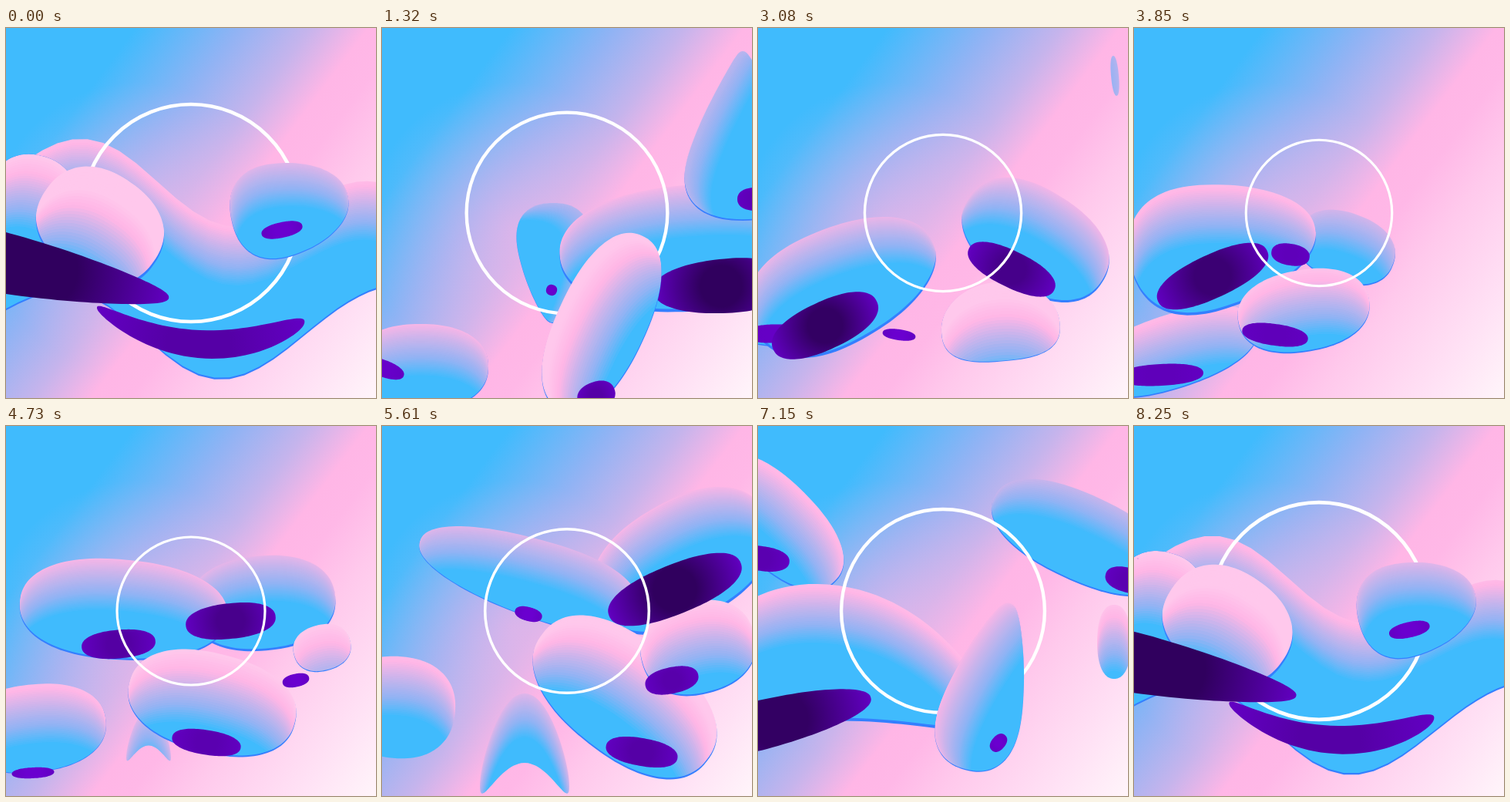
An HTML page with a canvas for the animation above (8.36 s loop, 480 by 480 pixels).

```html
<!DOCTYPE html>
<html lang="en">
<head>
<meta charset="utf-8">
<title>Flowing shapes</title>
<style>
  html, body { margin: 0; width: 100%; height: 100%; overflow: hidden; }
  canvas { display: block; width: 480px; height: 480px; }
</style>
</head>
<body>
<canvas width="480" height="480"></canvas>
<script>
const SIZE = 480, LOOP = 8360, STEP = 110, DEPTH = 95, BANDS = 30;
const stage = document.querySelector("canvas").getContext("2d");
const layer = new OffscreenCanvas(SIZE, SIZE).getContext("2d");

const RAMP = [[255, 200, 236], [255, 182, 230], [198, 180, 236], [145, 179, 244], [64, 187, 253]];
const ORDER = ["cap", "spur", "edge", "main", "lobe", "fold", "nose"];

// body and hole: x, y, half length, half thickness, tilt in degrees, taper, bend, wave
// tone: where on the ramp the lit side starts; front: above the ring
const POSES = [
  { time: 0,
    main: { body: [188, 300, 370, 102, 4, 0, 0, 50], hole: [250, 410, 135, 18, 4, .2, -38] },
    lobe: { body: [30, 232, 60, 68, 15], tone: 0 },
    fold: { body: [122, 258, 85, 70, 35], hole: [40, 314, 175, 36, 12, -.45], tone: -.3, front: true },
    nose: { body: [368, 234, 77, 60, -12, -.2], hole: [358, 262, 27, 10, -12], tone: .4, front: true } },
  { time: 1320,
    cap: { body: [222, 305, 78, 42, 90, -.5], hole: [220, 340, 7, 7, 20], tone: .6 },
    main: { body: [410, 285, 180, 82, -4], hole: [440, 335, 88, 35, -4, .1], tone: .3 },
    lobe: { body: [50, 440, 88, 56, 0], hole: [0, 441, 30, 11, 20], tone: .3 },
    fold: { body: [285, 383, 125, 58, -65], hole: [278, 477, 25, 18, -20], tone: -.1, front: true },
    nose: { body: [468, 140, 110, 62, -90, -.7], hole: [485, 222, 24, 15, 0], tone: .55, front: true } },
  { time: 2310,
    cap: { body: [35, 306, 82, 53, 15], hole: [5, 343, 22, 10, 0], tone: .1 },
    main: { body: [445, 265, 140, 85, 45], hole: [455, 332, 98, 33, 42] },
    lobe: { body: [105, 382, 135, 70, -42], hole: [72, 450, 70, 34, -25], tone: .5 },
    fold: { body: [408, 395, 68, 50, 0, 0, 20], tone: -.5 },
    nose: { body: [463, 62, 52, 10, 85], tone: .6 } },
  { time: 3850,
    cap: { body: [50, 420, 115, 48, -18], hole: [35, 450, 55, 14, -3] },
    main: { body: [275, 285, 65, 45, 20], hole: [203, 294, 25, 14, 10], tone: .45 },
    lobe: { body: [115, 282, 122, 80, -10, -.25], hole: [102, 322, 78, 28, -25] },
    fold: { body: [220, 367, 86, 53, -10], hole: [183, 398, 43, 14, 8], tone: .1 } },
  { time: 5610,
    cap: { body: [20, 365, 75, 66, 5] },
    spur: { body: [185, 392, 58, 45, 0, 0, 75], tone: .4 },
    main: { body: [390, 175, 125, 78, -30], hole: [380, 212, 92, 32, -22], tone: .3 },
    lobe: { body: [190, 195, 148, 50, 18, .15], hole: [190, 244, 18, 9, 15], tone: .4 },
    fold: { body: [315, 352, 135, 76, 38], hole: [337, 423, 47, 18, 10], tone: -.1 },
    nose: { body: [410, 288, 75, 60, -15], hole: [376, 330, 35, 17, -12], tone: 0 } },
  { time: 7150,
    edge: { body: [462, 280, 22, 48, 0], tone: .1 },
    main: { body: [420, 145, 125, 56, 25], hole: [480, 200, 30, 16, 15], tone: .5 },
    lobe: { body: [22, 125, 110, 54, 45], hole: [5, 172, 36, 16, 8] },
    fold: { body: [100, 295, 200, 88, 3, -.2, 65], hole: [28, 382, 122, 31, -14, -.2] },
    nose: { body: [298, 338, 112, 48, -75, -.5], hole: [312, 411, 13, 9, -50], tone: .3, front: true } }
];

const clamp = (x, lo, hi) => Math.max(lo, Math.min(hi, x));
const mix = (a, b, u) => a + (b - a) * u;
const mixAll = (a, b, u) => a.map((x, i) => mix(x, b[i], u));
const rgb = c => `rgb(${c.map(Math.round)})`;
const radians = deg => deg * Math.PI / 180;

function ramp(s) {
  const at = clamp(s, 0, 1) * (RAMP.length - 1);
  const i = Math.min(Math.floor(at), RAMP.length - 2);
  return rgb(mixAll(RAMP[i], RAMP[i + 1], at - i));
}

// A soft oval that can taper, bend and ripple along its length.
function shape([x, y, length, thick, tilt, taper, bend, wave], shiftY = 0) {
  const path = new Path2D(), cos = Math.cos(radians(tilt)), sin = Math.sin(radians(tilt));
  const soft = v => Math.sign(v) * Math.abs(v) ** .88;
  for (let k = 0; k < 120; k++) {
    const a = k * Math.PI / 60, c = soft(Math.cos(a)), px = length * c;
    const py = thick * soft(Math.sin(a)) * (1 + taper * c) + bend * c * c + wave * Math.sin(px * Math.PI / 200);
    path.lineTo(x + px * cos - py * sin, y + px * sin + py * cos + shiftY);
  }
  path.closePath();
  return path;
}

const full = p => [...p, 0, 0, 0].slice(0, 8);
const shrunk = p => p.map((v, i) => i === 2 || i === 3 || i > 5 ? 0 : v);

// A part missing on one side grows from, or shrinks to, its own place.
function morph(a, b, u) {
  if (!a && !b) return null;
  const from = a && full(a), to = b && full(b);
  return mixAll(from || shrunk(to), to || shrunk(from), u);
}

function blend(a, b, u) {
  if (!a && !b) return null;
  const from = a || b, to = b || a;
  return {
    body: morph(a?.body, b?.body, u),
    hole: morph(a?.hole, b?.hole, u),
    tone: mix(from.tone ?? .2, to.tone ?? .2, u),
    front: (u < .5 ? from : to).front
  };
}

// Bands of colour follow the lit edge: the same outline, slid step by step into the shade.
function drawBody({ body, hole, tone }) {
  const path = shape(body), lean = radians(body[4] * .6), slide = DEPTH * (1 - tone) / BANDS;
  layer.globalCompositeOperation = "source-over";
  layer.fillStyle = ramp(tone);
  layer.fillRect(0, 0, SIZE, SIZE);
  layer.save();
  for (let k = 1; k <= BANDS; k++) {
    layer.translate(-Math.sin(lean) * slide, Math.cos(lean) * slide);
    layer.fillStyle = ramp(mix(tone, 1, k / BANDS));
    layer.fill(path);
  }
  layer.restore();
  if (hole) {
    const below = shape(body, -Math.min(4, hole[3] / 8));
    below.rect(-SIZE, -SIZE, 3 * SIZE, 3 * SIZE);
    layer.fillStyle = "#347fff";
    layer.fill(below, "evenodd");
  }
  layer.globalCompositeOperation = "destination-in";
  layer.fill(path);
  stage.drawImage(layer.canvas, 0, 0);
}

function drawHole({ hole }) {
  if (!hole) return;
  const [x, y, length, thick] = hole;
  const core = rgb(mixAll([106, 0, 207], [48, 0, 94], clamp((thick - 10) / 22, 0, 1)));
  const glow = stage.createRadialGradient(x, y, 0, x, y, length + 1);
  glow.addColorStop(.3, core);
  glow.addColorStop(1, "#6200c2");
  stage.fillStyle = glow;
  stage.fill(shape(hole));
}

function drawLayer(bodies) {
  bodies.forEach(drawBody);
  bodies.forEach(drawHole);
}

const sky = stage.createLinearGradient(0, 0, 538, 403);
[[.2, "#40bbfd"], [.36, "#91b3f4"], [.47, "#c6b4ec"], [.56, "#ffb6e6"], [.62, "#ffb8e7"],
 [.71, "#ffc9ec"], [.88, "#ffe2f5"], [1, "#fff5fa"]].forEach(s => sky.addColorStop(...s));
const haze = stage.createRadialGradient(170, 260, 0, 170, 260, 190);
haze.addColorStop(0, "rgba(255, 182, 230, .5)");
haze.addColorStop(1, "rgba(255, 182, 230, 0)");

function drawRing(t) {
  const r = 117.5 + 23.5 * Math.cos(2 * Math.PI * t / LOOP);
  stage.beginPath();
  stage.arc(240, 240, r, 0, 2 * Math.PI);
  stage.lineWidth = r / 30;
  stage.strokeStyle = "#fff";
  stage.stroke();
}

const easeIn = u => u * u * (2 - u);

function draw(t) {
  const i = POSES.findLastIndex(p => p.time <= t), last = i === POSES.length - 1;
  const from = POSES[i], to = POSES[last ? 0 : i + 1];
  let u = (t - from.time) / ((last ? LOOP : to.time) - from.time);
  // The flow rests for a moment where the loop closes.
  if (i === 0) u = easeIn(u);
  if (last) u = 1 - easeIn(1 - u);

  for (const fill of [sky, haze]) {
    stage.fillStyle = fill;
    stage.fillRect(0, 0, SIZE, SIZE);
  }
  const bodies = ORDER.map(name => blend(from[name], to[name], u)).filter(Boolean);
  drawLayer(bodies.filter(b => !b.front));
  drawRing(t);
  drawLayer(bodies.filter(b => b.front));
}

const begin = performance.now();
function frame() {
  const t = (performance.now() - begin) % LOOP;
  draw(Math.floor(t / STEP) * STEP);
  requestAnimationFrame(frame);
}
frame();
</script>
</body>
</html>
```
